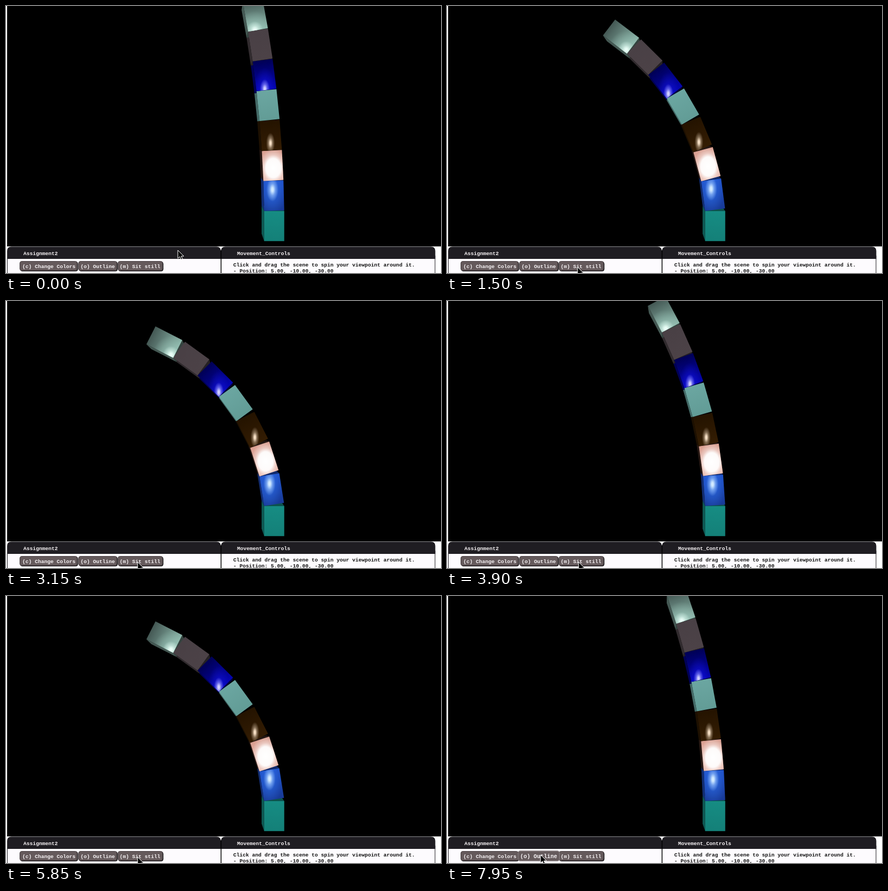
These frames come from a looping animation (800 by 492 pixels, 8 s). An HTML page with a canvas:

```html
<!DOCTYPE html>
<html lang="en">
<head>
<meta charset="utf-8">
<title>Swaying boxes</title>
<style>
  html, body { margin: 0; width: 100%; height: 100%; overflow: hidden; background: #fff; }
  canvas, svg { position: absolute; left: 0; top: 0; width: 800px; height: 492px; }
  text { font: bold 9.6px "Liberation Mono", "Courier New", monospace; fill: #111; white-space: pre; }
  .light text, text.light { fill: #f6f2f4; }
  .button { transform-box: fill-box; transform-origin: center; }
  .button rect { fill: #655a5c; stroke: #453c3f; filter: drop-shadow(1px 1px 0 #151315); }
  .button.hover { transform: scale(1.075); }
  .button.hover rect { stroke: #8d8486; filter: none; }
</style>
</head>
<body>
<canvas id="scene" width="800" height="492"></canvas>
<svg viewBox="0 0 800 492">
  <rect y="443" width="800" height="49" fill="#fff"/>
  <g fill="#fdfbfe" stroke="#1f1d22">
    <path d="M2.5 493V460H395.5V493M395.5 493V460H789V493"/>
  </g>
  <g fill="#1f1d22">
    <path d="M2 466V451.5q0-8 8-8H387q8 0 8 8V466ZM395.5 466V451.5q0-8 8-8H781.5q8 0 8 8V466Z"/>
  </g>
  <path d="M395.5 450V492" stroke="#000" stroke-width="1.5"/>
  <text class="light" x="32" y="459">Assignment2</text>
  <text class="light" x="425" y="459">Movement_Controls</text>
  <g class="light">
    <g class="button"><rect x="25.5" y="470.5" width="105.5" height="17" rx="3.5"/><text x="30" y="483">(c) Change Colors</text></g>
    <g class="button"><rect x="206" y="470.5" width="82" height="17" rx="3.5"/><text x="209" y="483">(m) Sit still</text></g>
    <g class="button" id="outline"><rect x="133.5" y="470.5" width="70.5" height="17" rx="3.5"/><text x="137" y="483">(o) Outline</text></g>
  </g>
  <text x="418" y="479.5">Click and drag the scene to spin your viewpoint around it.</text>
  <text x="418" y="490.5">- Position: 5.00, -10.00, -30.00</text>
  <path id="cursor" d="M0 0V15L3.6 11.8L6 17.2L8.6 16L6.2 11H11Z" fill="#000" stroke="#fff"/>
</svg>
<script>
const ctx = document.getElementById('scene').getContext('2d');
const cursor = document.getElementById('cursor');
const outline = document.getElementById('outline');

const LOOP = 8000, STEP = 50, RAD = Math.PI / 180;
const MAX_ANGLE = 9, START_PHASE = 222.5;
const STILL = [[2900, 3450], [5600, 6100]];
const WIDTH = 2, HEIGHT = 3;

// bottom/top: front colours; spot: highlight in box units, with drift per degree of bend
const BOXES = [
  { bottom: [20, 128, 120], top: [22, 140, 131] },
  { bottom: [24, 58, 150], top: [30, 78, 196],
    spot: { at: [.88, 2.12], drift: [0, 0], size: [11, 22], color: '215,238,255', halo: '48,116,240' } },
  { bottom: [232, 178, 164], top: [218, 160, 146], side: [60, 38, 30],
    spot: { at: [1.05, 1.25], drift: [0, 0], size: [27, 35], color: '255,255,255', core: .5 } },
  { bottom: [52, 29, 3], top: [36, 19, 0],
    spot: { at: [.92, .72], drift: [-.003, 0], size: [8, 19], color: '255,232,205' } },
  { bottom: [98, 156, 150], top: [107, 166, 161] },
  { bottom: [4, 4, 178], top: [0, 0, 84],
    spot: { at: [.95, .07], drift: [-.07, .028], size: [9, 18], color: '215,215,255', halo: '22,22,235' } },
  { bottom: [76, 66, 71], top: [73, 64, 69] },
  { bottom: [138, 180, 168], top: [68, 88, 84],
    spot: { at: [.8, 0], drift: [-.07, .037], size: [15, 16], color: '235,255,248', halo: '165,208,195' } }
];

const rgb = (color, k = 1) => `rgb(${color.map(c => Math.round(c * k))})`;
const project = ([x, y, z]) => {
  const scale = 535 / (30 - z);
  return [401 + (x + 5) * scale, 221 - (y - 10) * scale];
};

function bendAt(t) {
  if (STILL.some(([from, to]) => t >= from && t < to)) return MAX_ANGLE;
  return MAX_ANGLE / 2 * (1 + Math.sin((START_PHASE + t * .36) * RAD));
}

// Each box hinges on the upper left edge of the one below.
function buildStack(bend) {
  let x = -1, y = -1.5;
  return BOXES.map((box, i) => {
    const sin = Math.sin(i * bend * RAD), cos = Math.cos(i * bend * RAD);
    const ox = x, oy = y;
    const point = (u, v, z) => project([ox + u * cos - v * sin, oy + u * sin + v * cos, z]);
    x -= HEIGHT * sin;
    y += HEIGHT * cos;
    return { box, point };
  });
}

function tracePath(points) {
  ctx.beginPath();
  points.forEach(p => ctx.lineTo(...p));
  ctx.closePath();
}

function isFacing([a, b, c]) {
  return (b[0] - a[0]) * (c[1] - a[1]) - (b[1] - a[1]) * (c[0] - a[0]) < 0;
}

const CORNERS = [[0, 0], [WIDTH, 0], [WIDTH, HEIGHT], [0, HEIGHT]];
const SHADES = [.5, .85, .62, .66];

function drawSides({ box, point }) {
  const color = box.side || box.bottom.map((c, i) => (c + box.top[i]) / 2);
  CORNERS.forEach((a, i) => {
    const b = CORNERS[(i + 1) % 4];
    const face = [point(...a, 1), point(...a, -1), point(...b, -1), point(...b, 1)];
    if (!isFacing(face)) return;
    tracePath(face);
    ctx.fillStyle = rgb(color, SHADES[i]);
    ctx.fill();
  });
}

function paintGlow(color, core, radius) {
  const glow = ctx.createRadialGradient(0, 0, 0, 0, 0, radius);
  glow.addColorStop(0, `rgba(${color},1)`);
  glow.addColorStop(core, `rgba(${color},.95)`);
  glow.addColorStop(core + (1 - core) * .4, `rgba(${color},.4)`);
  glow.addColorStop(1, `rgba(${color},0)`);
  ctx.fillStyle = glow;
  ctx.fillRect(-radius, -radius, 2 * radius, 2 * radius);
}

function drawSpot({ at, drift, size, color, halo, core = .16 }, point, bend) {
  ctx.translate(...point(at[0] + drift[0] * bend, at[1] + drift[1] * bend, 1));
  ctx.scale(...size);
  if (halo) paintGlow(halo, .1, 2.2);
  paintGlow(color, core, 1);
}

function drawFront({ box, point }, bend) {
  const fill = ctx.createLinearGradient(...point(1, 0, 1), ...point(1, HEIGHT, 1));
  fill.addColorStop(0, rgb(box.bottom));
  fill.addColorStop(1, rgb(box.top));
  ctx.save();
  tracePath(CORNERS.map(c => point(...c, 1)));
  ctx.fillStyle = fill;
  ctx.fill();
  if (box.spot) {
    ctx.clip();
    drawSpot(box.spot, point, bend);
  }
  ctx.restore();
}

const CURSOR_PATH = [
  [0, 316, 450], [300, 316, 450], [1100, 240, 481], [1700, 240, 481],
  [2400, 242, 481], [6500, 242, 481], [7000, 229, 480], [7800, 172, 477], [LOOP, 172, 477]
];

function cursorAt(t) {
  const i = CURSOR_PATH.findIndex(key => key[0] > t);
  const [t0, x0, y0] = CURSOR_PATH[i - 1], [t1, x1, y1] = CURSOR_PATH[i];
  const p = (t - t0) / (t1 - t0), ease = p * p * (3 - 2 * p);
  return [x0 + (x1 - x0) * ease, y0 + (y1 - y0) * ease];
}

function render(t) {
  ctx.fillStyle = '#000';
  ctx.fillRect(2, 0, 798, 443);
  const bend = bendAt(t);
  const stack = buildStack(bend);
  stack.forEach(drawSides);
  stack.forEach(item => drawFront(item, bend));
  cursor.setAttribute('transform', `translate(${cursorAt(t)})`);
  outline.classList.toggle('hover', t >= 7700);
}

const start = performance.now();
function tick() {
  const elapsed = performance.now() - start;
  render(Math.floor(elapsed / STEP) * STEP % LOOP);
  requestAnimationFrame(tick);
}
tick();
</script>
</body>
</html>
```
